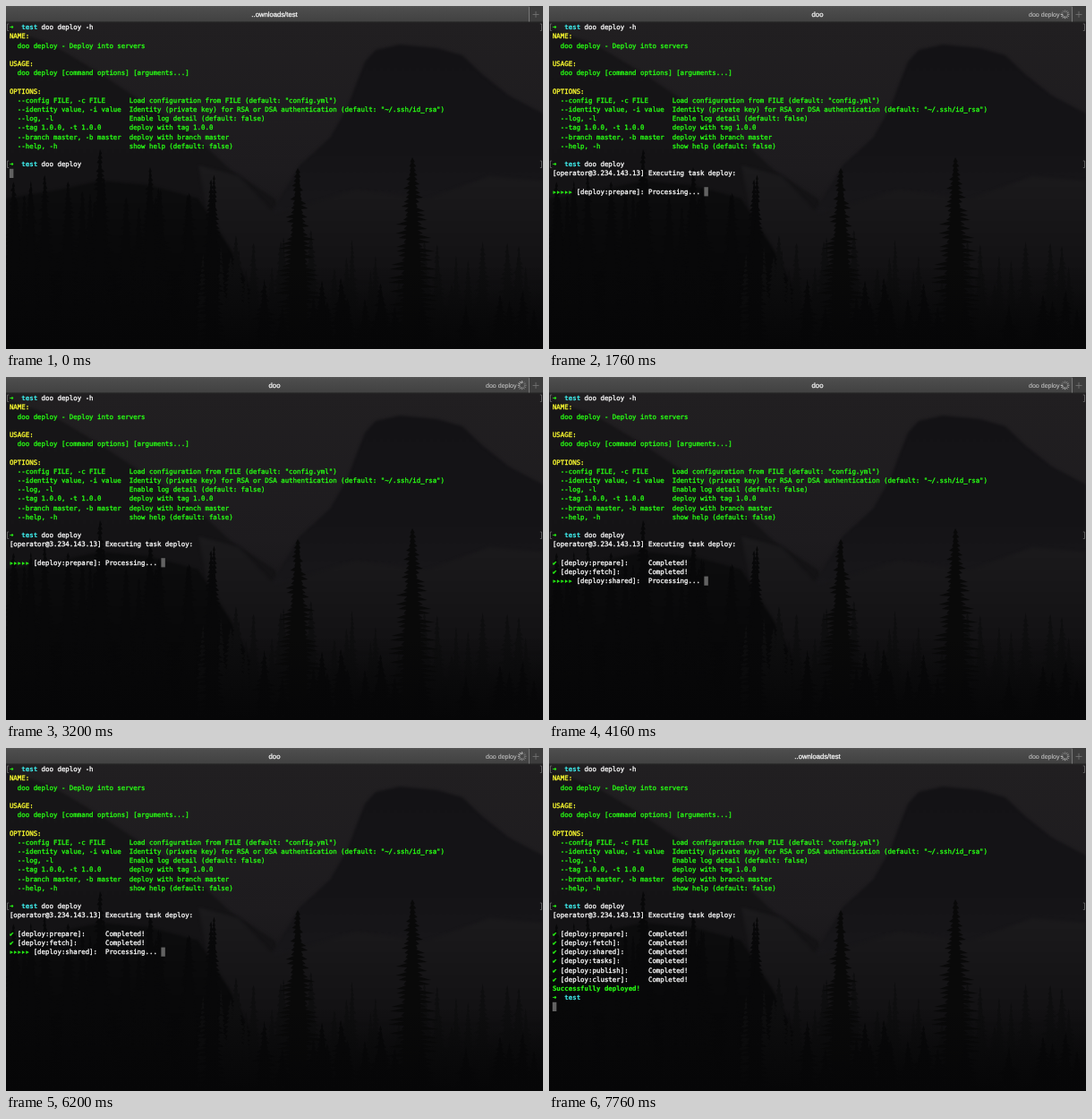
Write an HTML page with a canvas that moves like this. It is 600x383 px and loops after 7.8 s.

```html
<!DOCTYPE html>
<html lang="en">
<head>
<meta charset="utf-8">
<title>Deploy terminal</title>
<style>
html, body { margin: 0; width: 100%; height: 100%; overflow: hidden; background: #111; }
canvas { display: block; width: 600px; height: 383px; }
</style>
</head>
<body>
<canvas id="stage" width="600" height="383"></canvas>
<script>
const W = 600, H = 383, LOOP = 7800;
const COL = 4.46, ROW = 10.2, LEFT = 3.9, BASE = 26.2;
const GREEN = '#28fe14', YELLOW = '#fdfd30', CYAN = '#3fe8e8', WHITE = '#fafafa', GREY = '#626262';
const MONO = '7.41px "DejaVu Sans Mono", monospace';
const SANS = '"Liberation Sans", Arial, sans-serif';

const START = 120, BUSY = 820, DONE = 7640;
const TASKS = [
  ['prepare', START], ['fetch', 3600], ['shared', 4080],
  ['tasks', 6900], ['publish', 7280], ['cluster', 7440]
];
const HELP = [
  [1, YELLOW, 'NAME:'],
  [2, GREEN, '  doo deploy - Deploy into servers'],
  [4, YELLOW, 'USAGE:'],
  [5, GREEN, '  doo deploy [command options] [arguments...]'],
  [7, YELLOW, 'OPTIONS:'],
  [8, GREEN, '  --config FILE, -c FILE      Load configuration from FILE (default: "config.yml")'],
  [9, GREEN, '  --identity value, -i value  Identity (private key) for RSA or DSA authentication (default: "~/.ssh/id_rsa")'],
  [10, GREEN, '  --log, -l                   Enable log detail (default: false)'],
  [11, GREEN, '  --tag 1.0.0, -t 1.0.0       deploy with tag 1.0.0'],
  [12, GREEN, '  --branch master, -b master  deploy with branch master'],
  [13, GREEN, '  --help, -h                  show help (default: false)']
];

const stage = document.getElementById('stage').getContext('2d');
const backdrop = document.createElement('canvas');
backdrop.width = W;
backdrop.height = H;
let g = backdrop.getContext('2d');

function gradient(y0, y1, ...stops) {
  const fill = g.createLinearGradient(0, y0, 0, y1);
  stops.forEach(([at, color]) => fill.addColorStop(at, color));
  return fill;
}

function shape(fill, ...points) {
  g.fillStyle = fill;
  g.beginPath();
  points.forEach(([x, y]) => g.lineTo(x, y));
  g.fill();
}

let seed = 11;
function random() {
  seed = (seed * 16807) % 2147483647;
  return seed / 2147483647;
}

// A ragged conifer, built from its tip down one side and up the other
function tree(x, top, width, fill) {
  const left = [], right = [];
  const steps = Math.ceil((H - top) / 5);
  for (let i = 0; i <= steps; i++) {
    const y = top + i * 5, reach = width * Math.min(1, 0.12 + 1.5 * i / steps);
    left.push([x - reach * (0.4 + 0.6 * random()), y], [x - reach * 0.3, y + 1]);
    right.push([x + reach * (0.4 + 0.6 * random()), y], [x + reach * 0.3, y + 1]);
  }
  shape(fill, [x, top - 5], ...right, ...left.reverse());
}

function paintBackdrop() {
  g.fillStyle = gradient(18, H, [0, '#211f21'], [0.45, '#1d1b1e'], [0.7, '#161517'], [1, '#0a0a0b']);
  g.fillRect(0, 0, W, H);
  g.filter = 'blur(1.5px)';
  shape(gradient(20, 260, [0, '#161517'], [1, '#131214']),
    [0, 25], [50, 42], [105, 75], [150, 105], [205, 140], [250, 182], [300, 215], [320, 260], [0, 270]);
  shape(gradient(45, 240, [0, '#131215'], [0.6, '#141316'], [1, '#18171a']),
    [290, 240], [328, 178], [362, 147], [382, 112], [392, 85], [401, 62], [413, 49], [440, 43],
    [482, 47], [510, 55], [532, 76], [562, 100], [600, 120], [600, 250]);
  shape(gradient(180, 310, [0, '#1b1a1c'], [1, '#111012']),
    [215, 178], [260, 190], [300, 232], [390, 205], [470, 215], [540, 190], [600, 195], [600, 310], [240, 310]);
  shape(gradient(205, 300, [0, '#0c0c0d'], [1, '#070708']),
    [0, 215], [60, 205], [105, 195], [160, 200], [215, 215], [250, 270], [275, 320], [280, H], [0, H]);
  g.filter = 'none';

  for (let i = 0; i < 34; i++) tree(220 + random() * 380, 255 + random() * 60, 9 + random() * 8, '#0e0e0f');
  for (let i = 0; i < 22; i++) tree(random() * 235, 192 + random() * 45, 12 + random() * 9, '#080809');
  tree(105, 165, 20, '#080809');
  tree(161, 185, 20, '#080809');
  tree(326, 186, 30, '#090909');
  tree(454, 174, 30, '#090909');
  for (let i = 0; i < 30; i++) tree(random() * W, 305 + random() * 40, 15, '#080809');
  g.fillStyle = gradient(290, H, [0, '#06060700'], [1, '#060607']);
  g.fillRect(0, 290, W, H - 290);

  g.fillStyle = gradient(0, 18, [0, '#555'], [0.12, '#4d4d4d'], [1, '#414141']);
  g.fillRect(0, 0, W, 18);
  g.fillStyle = '#3d3d3d';
  g.fillRect(585, 0, 15, 18);
  g.fillStyle = '#2a2a2a';
  g.fillRect(0, 17.3, W, 1);
  g.fillStyle = '#777';
  g.fillRect(584, 1, 1, 16.5);
  g.fillRect(588.5, 9, 7, 0.8);
  g.fillRect(591.6, 5.9, 0.8, 7);
}

// A hairline outline gives the glyphs their slightly heavy weight
function glyphs(text, x, y, color, weight) {
  g.fillStyle = g.strokeStyle = color;
  g.lineWidth = weight;
  g.fillText(text, x, y);
  g.strokeText(text, x, y);
}

function write(row, col, color, text, bold) {
  g.font = (bold ? 'bold ' : '') + MONO;
  g.textAlign = 'left';
  [...text].forEach((ch, i) => {
    if (ch !== ' ') glyphs(ch, LEFT + (col + i) * COL, BASE + row * ROW, color, bold ? 0.15 : 0.32);
  });
}

function label(text, x, align, size, color, weight) {
  g.font = size + 'px ' + SANS;
  g.textAlign = align;
  glyphs(text, x, 12.3, color, weight);
}

function cursor(row, col) {
  g.fillStyle = GREY;
  g.fillRect(LEFT + col * COL, 18.6 + row * ROW, COL, ROW);
}

function prompt(row, command) {
  write(row, 0, GREEN, '➜', true);
  write(row, 3, CYAN, 'test', true);
  if (!command) return;
  write(row, 8, WHITE, command);
  g.strokeStyle = '#777';
  g.lineWidth = 0.7;
  const y = 20 + row * ROW;
  for (const [edge, inner] of [[1.5, 3.2], [598.5, 596.8]]) {
    g.beginPath();
    g.moveTo(inner, y);
    g.lineTo(edge, y);
    g.lineTo(edge, y + 7.5);
    g.lineTo(inner, y + 7.5);
    g.stroke();
  }
}

function spinner(t) {
  const head = Math.floor(t / 200 * 12);
  g.lineWidth = 0.9;
  for (let i = 0; i < 12; i++) {
    const a = i * Math.PI / 6, age = ((head - i) % 12 + 12) % 12;
    g.strokeStyle = `rgba(235,235,235,${0.95 - age * 0.065})`;
    g.beginPath();
    g.moveTo(576.6 + 2.4 * Math.sin(a), 9.3 - 2.4 * Math.cos(a));
    g.lineTo(576.6 + 4.9 * Math.sin(a), 9.3 - 4.9 * Math.cos(a));
    g.stroke();
  }
}

function drawTasks(t) {
  write(16, 0, WHITE, '[operator@3.234.143.13] Executing task deploy:');
  TASKS.forEach(([name, from], i) => {
    if (t < from) return;
    const row = 18 + i, tag = `[deploy:${name}]:`;
    const end = i + 1 < TASKS.length ? TASKS[i + 1][1] : DONE;
    if (t >= end) {
      write(row, 0, GREEN, '✔');
      write(row, 2, WHITE, tag);
      write(row, 24, WHITE, 'Completed!');
    } else {
      const lit = Math.floor((t - from) / 20) % 6;
      for (let k = 0; k < 5; k++) write(row, k, GREEN, k + 1 === lit ? '▸' : '▹');
      write(row, 6, WHITE, tag);
      write(row, 24, WHITE, 'Processing...');
      cursor(row, 38);
    }
  });
}

function draw(t) {
  g.drawImage(backdrop, 0, 0);
  const running = t >= START, done = t >= DONE;
  label(running && !done ? 'doo' : '..ownloads/test', 300, 'center', 7.7, '#f4f4f4', 0.3);
  if (running) label('doo deploy', t < BUSY ? 583 : 570.5, 'right', 7.05, '#c0c0c0', 0.1);
  if (t >= BUSY) spinner(t);

  prompt(0, 'doo deploy -h');
  HELP.forEach(([row, color, text]) => write(row, 0, color, text));
  prompt(15, 'doo deploy');
  if (running) drawTasks(t);
  else cursor(16, 0);
  if (done) {
    write(24, 0, GREEN, 'Successfully deployed!', true);
    prompt(25);
    cursor(26, 0);
  }
}

paintBackdrop();
g = stage;
g.textRendering = 'geometricPrecision';
g.lineJoin = 'round';
const began = performance.now();
function tick() {
  draw((performance.now() - began) % LOOP);
  requestAnimationFrame(tick);
}
draw(0);
requestAnimationFrame(tick);
</script>
</body>
</html>
```
